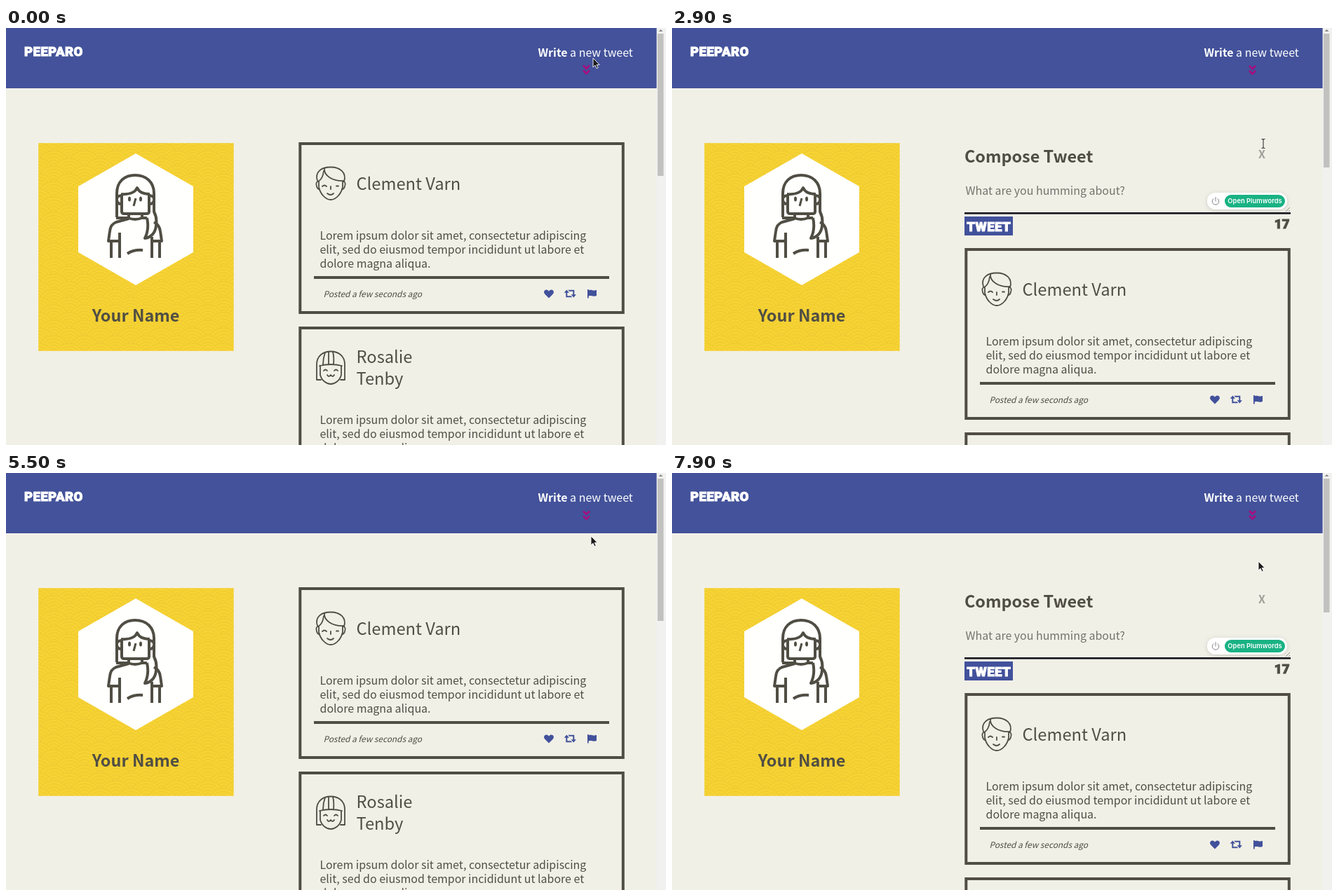
An HTML page for the animation above (8 s loop, 941 by 595 pixels).

```html
<!DOCTYPE html>
<html lang="en">
<head>
<meta charset="utf-8">
<title>Compose panel</title>
<style>
  html, body { margin: 0; width: 100%; height: 100%; overflow: hidden; background: #f1f0e7; }
  svg { display: block; }
  text { font-family: "Noto Sans CJK JP", "Noto Sans CJK SC", "Noto Sans CJK", "Open Sans", sans-serif; font-size: 15.95px; fill: #504e44; white-space: pre; }
  .name { font-size: 23.7px; }
  .head { font-size: 23.4px; font-weight: 600; }
  .posted { font-size: 11.85px; font-style: italic; }
  .block { font-family: Roboto, Inter, sans-serif; font-weight: 900; font-size: 18.6px; stroke-width: 1; letter-spacing: .4px; }
  .white { fill: #fff; }
  .line { fill: none; stroke: #504e44; stroke-linecap: round; stroke-linejoin: round; }
  .blue { fill: #42519b; }
</style>
</head>
<body>
<svg id="stage" width="941" height="595" viewBox="0 0 941 595">
  <defs>
    <g id="scale" fill="#f6d333" stroke="#eec831" stroke-width="1">
      <circle r="22"/><circle r="17.5"/><circle r="13"/><circle r="8.5"/><circle r="4"/>
    </g>
    <pattern id="waves" x="46" y="164" width="44" height="22" patternUnits="userSpaceOnUse"></pattern>
    <clipPath id="panelClip"><rect id="clip" x="410" y="146" width="480" height="0"/></clipPath>
    <filter id="soft" x="-20%" y="-50%" width="140%" height="220%">
      <feDropShadow dx="0" dy="1.5" stdDeviation="3" flood-color="#000" flood-opacity=".16"/>
    </filter>
  </defs>

  <rect width="941" height="595" fill="#f1f0e7"/>
  <rect width="928" height="86" fill="#43529a"/>
  <text class="block white" x="26" y="40" stroke="#fff">PEEPARO</text>
  <text class="white" x="758.5" y="41"><tspan font-weight="600">Write</tspan> a new tweet</text>
  <path id="chevron" d="M-4.5 -6 L0 -1.7 L4.5 -6 M-4.5 1 L0 5.3 L4.5 1" fill="none" stroke="#a50f80" stroke-width="2.8"/>

  <rect x="46.200" y="164.200" width="278.500" height="296.600" fill="url(#waves)"/>
  <path d="M185 179 L267 226 V320 L185 367 L103 320 V226 Z" fill="#fffffd"/>
  <g class="line" stroke-width="4" style="stroke-linecap:butt">
    <path d="M158 270 V236 C158 219 169 210 184 210 C200 210 211 220 211 236 V262 C214 268 215 276 214 282 C213 293 206 299 198 300 C203 290 203 280 201 271"/>
    <path d="M157 271 H175 V264 M194 264 V271 H201"/>
    <path d="M165 237 V262 Q165 265 169 265 H200 Q204 265 204 262 V237"/>
    <path d="M164 237 C175 238 184 235 187 228 C190 235 196 237 205 237"/>
    <path d="M164 239 Q157 240 158 246 Q159 251 164 251 M205 239 Q212 240 211 246 Q210 251 205 251"/>
    <path d="M185 243 L182 254" stroke-width="3"/>
    <path d="M174 271 Q184 275 194 271 M175 272 L157 277 Q149 280 148 290 L146 304 H161 M150 304 V328 M162 292 V328"/>
    <path d="M211 277 Q219 281 220 290 L222 304 H208 M219 304 V328 M208 298 V328 M173 322 Q182 316 195 317"/>
  </g>
  <g fill="#504e44"><ellipse cx="176" cy="244" rx="2" ry="3.6"/><ellipse cx="192" cy="244" rx="2" ry="3.6"/></g>
  <text class="head" x="185" y="418.5" text-anchor="middle">Your Name</text>

  <g clip-path="url(#panelClip)">
    <g id="panel">
      <text class="head" x="417" y="192">Compose Tweet</text>
      <text x="836" y="186" font-weight="600" style="fill:#a09f99">X</text>
      <text x="418.5" y="238" style="fill:#74736c">What are you humming about?</text>
      <path id="caret" d="M419.5 220 V244" stroke="#222" stroke-width="1"/>
      <path d="M875 262 L881 256 M879 262 L881 260" stroke="#77766f" stroke-width=".8"/>
      <rect x="417" y="263" width="465" height="2.6" fill="#15151c"/>
      <rect class="blue" x="417" y="269" width="69" height="27"/>
      <text class="block white" x="451.7" y="289.5" text-anchor="middle" stroke="#fff">TWEET</text>
      <text class="block" x="881" y="286" text-anchor="end" stroke="#504e44">17</text>
    </g>
  </g>

  <g id="cards"></g>

  <g id="pill">
    <rect x="763" y="-12" width="114" height="24" rx="12" fill="#fff" filter="url(#soft)"/>
    <path d="M772 -3.4 A4.8 4.8 0 1 0 778 -3.4 M775 -5.5 V0" class="line" stroke-width="1" style="stroke:#85848a"/>
    <rect x="788" y="-9" width="86" height="18" rx="9" fill="#19b283"/>
    <text x="831" y="3.4" text-anchor="middle" style="font:600 9.4px Inter,Arial,sans-serif;fill:#fff">Open Plumwords</text>
  </g>

  <rect x="927.6" width="13.400" height="595" fill="#f1f1f0"/>
  <path d="M930.5 5 L933.5 2 L936.5 5 Z" fill="#8a8a8a"/>
  <rect id="thumb" x="929" y="8" width="8.5" fill="#c1c1c0"/>

  <path id="arrow" d="M0 0 V13 L3 10.2 L5 14.7 L7.2 13.7 L5.2 9.4 H9.2 Z" fill="#1c1c1c" stroke="#fff" stroke-width=".9"/>
  <path id="beam" d="M-2.5 -6.5 H-1 L0 -5.5 L1 -6.5 H2.5 M0 -5.5 V5.5 M-2.5 6.5 H-1 L0 5.5 L1 6.5 H2.5" fill="none" stroke="#333" stroke-width="1.1"/>
</svg>
<script>
const LOOP = 8000, PANEL = 151, CARD = 245;
const $ = id => document.getElementById(id);
const move = (id, x, y) => $(id).setAttribute('transform', `translate(${x} ${y})`);
const show = (id, on) => $(id).setAttribute('visibility', on ? 'visible' : 'hidden');

// Overlapping wave scales, painted top to bottom
let scales = '';
for (let row = -2; row <= 4; row++)
  for (let x = row % 2 ? -22 : -44; x <= 88; x += 44)
    scales += `<use href="#scale" x="${x}" y="${row * 11}"/>`;
$('waves').innerHTML = scales;

const boyFace = `
  <path d="M444 218 C440 205 450 198.500 463 198.500 C476 198.500 486 206 482 219"/>
  <path d="M454 200 C453 211 466 219 482 218 M453 204 C452 212 449 217 445 219"/>
  <path d="M446 219 V227 C448 237 456 245 463 245 C470 245 478 237 480 227 V219"/>
  <path d="M445 219 Q441 220 443 226 Q444 230 447 230 M481 219 Q485 220 483 226 Q482 230 479 230"/>
  <path d="M451 226 Q454 223 457 226 M471 225.500 H474 M463 226 V230 M458 236 Q463 240 467 236"/>`;
const girlFace = `
  <path d="M449 502 H443 V480 C443 468 452 461.500 463 461.500 C474 461.500 483 468 483 480 V502 H477"/>
  <path d="M447 482 Q463 478 479 482 M455 463 Q452 471 452 480 M460 462 V480 M466 462 Q468 470 467 480"/>
  <path d="M448 482 V495 C450 503 457 508 463 508 C469 508 476 503 478 495 V482"/>
  <path d="M453 489 Q455.500 486 458 489 M468 489 Q470.500 486 473 489 M458 495 Q460 499 463 495 Q466 499 468 495"/>`;

const lorem = ['Lorem ipsum dolor sit amet, consectetur adipiscing',
  'elit, sed do eiusmod tempor incididunt ut labore et', 'dolore magna aliqua.'];
const lines = (list, x, y, step, cls = '') =>
  list.map((s, i) => `<text class="${cls}" x="${x}" y="${y + i * step}">${s}</text>`).join('');

function card(top, name, nameY, face) {
  const foot = top + CARD;
  return `<rect x="419.300" y="${top + 2}" width="460.500" height="${CARD - 4}" fill="#f1f0e7" stroke="#504e44" stroke-width="4"/>
    <g class="line" stroke-width="1.8">${face}</g>
    ${lines(name, 499.5, nameY, 30.5, 'name')}
    ${lines(lorem, 447.5, foot - 106, 20)}
    <rect x="439" y="${foot - 54}" width="421" height="4" fill="#504e44"/>
    <text class="posted" x="452.5" y="${foot - 24}">Posted a few seconds ago</text>
    <g class="blue" transform="translate(0 ${foot - 29})">
      <path d="M774 6.5 L768.3 .7 C765.5 -2.5 768 -6 771 -5.5 Q773 -5.2 774 -3.5 Q775 -5.2 777 -5.5 C780 -6 782.5 -2.5 779.7 .7 Z"/>
      <path d="M799.3 -5.5 L803 -1.3 H800.3 V3.2 H805.5 L807.3 5.2 H798.3 V-1.3 H795.7 Z"/>
      <path d="M809.3 5.5 L805.6 1.3 H808.3 V-3.2 H803.1 L801.3 -5.2 H810.3 V1.3 H812.9 Z"/>
      <path d="M829 -6 H830.7 V-4.8 C834 -6.5 837 -3.3 842 -5.2 V3 C837 5 834 1.8 830.7 3.5 V6.5 H829 Z"/>
    </g>`;
}
$('cards').innerHTML =
  `<rect id="shadow" class="blue" x="427" y="173" width="464" height="${CARD}"/>` +
  card(163, ['Clement Varn'], 231, boyFace) +
  card(426, ['Rosalie', 'Tenby'], 478, girlFace);

const swing = p => .5 - Math.cos(Math.PI * Math.min(1, Math.max(0, p))) / 2;
// Each visit: panel opens, helper pill settles, panel closes
const visits = [
  { open: 873, blink: 1000, pill: 1000, settle: 1950, close: 4060 },
  { open: 5825, blink: 5950, pill: 6050, settle: 6900, close: Infinity }
];
const OPEN_MS = 500, CLOSE_MS = 400;

const pointer = [[0, 837, 43], [2000, 837, 43], [2500, 843, 165], [2950, 843, 165], [3150, 847, 174],
  [3400, 841, 182], [4850, 841, 182], [5250, 834, 90], [5550, 834, 90], [5750, 826, 41],
  [7400, 826, 41], [7800, 836, 126], [LOOP, 836, 126]];
function pointerAt(t) {
  const i = pointer.findIndex(k => k[0] > t);
  const [a, b] = [pointer[i - 1], pointer[i]];
  const p = swing((t - a[0]) / (b[0] - a[0]));
  return [a[1] + (b[1] - a[1]) * p, a[2] + (b[2] - a[2]) * p];
}

function draw(t) {
  const v = t < visits[1].open ? visits[0] : visits[1];
  const closing = t >= v.close;
  const h = PANEL * (closing ? 1 - swing((t - v.close) / CLOSE_MS) : swing((t - v.open) / OPEN_MS));
  $('clip').setAttribute('height', h);
  // The focused field scrolls the panel to its end while it grows
  move('panel', 0, closing ? 0 : Math.round(h - PANEL));
  move('cards', 0, Math.round(h));
  $('thumb').setAttribute('height', 203 - 12 * h / PANEL);
  show('caret', !closing && t >= v.blink && (t - v.blink) % 1000 < 500);
  show('pill', t >= v.pill && t < v.close + CLOSE_MS);
  move('pill', 0, t < v.settle ? 161 : 247);
  move('chevron', 827.5, 59.9 - Math.cos((t - 170) / 1000 * 2 * Math.PI));

  const [x, y] = pointerAt(t);
  const overText = t > 2350 && t < 4400;
  move('arrow', x, y);
  move('beam', x, y);
  show('arrow', !overText);
  show('beam', overText);
  show('shadow', t >= 4400 && t < 5500 && y > 164);
}

function tick() {
  draw(performance.now() % LOOP);
  requestAnimationFrame(tick);
}
tick();
</script>
</body>
</html>
```
